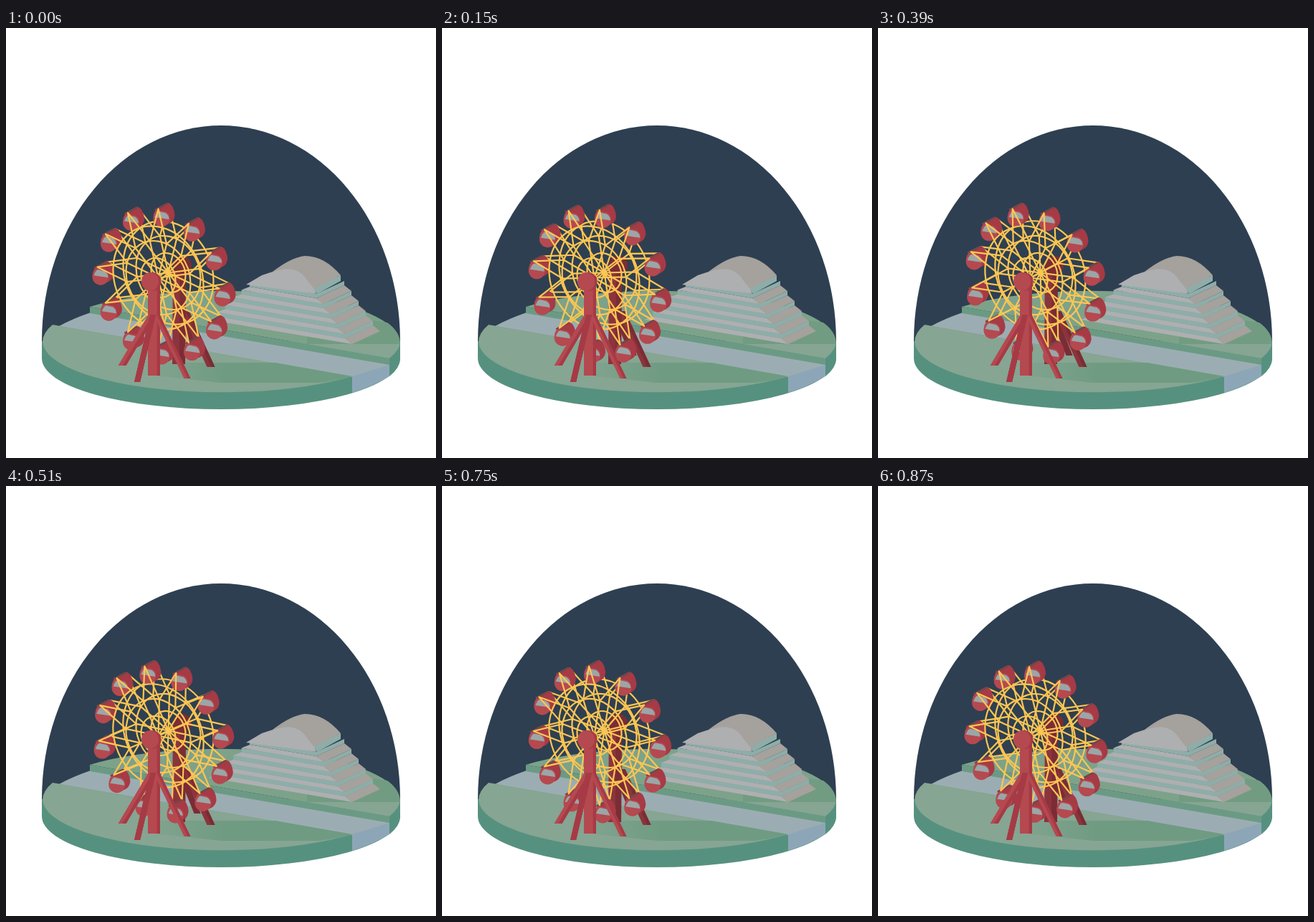
Animation of 600 by 600 pixels, one loop 900 ms. Source, as an HTML page with a canvas:

```html
<!DOCTYPE html>
<html>
<head>
<meta charset="utf-8">
<style>
  html, body { margin: 0; width: 100%; height: 100%; overflow: hidden; background: #fff; }
  canvas { display: block; }
</style>
</head>
<body>
<canvas id="stage" width="600" height="600"></canvas>
<script>
const ctx = document.getElementById('stage').getContext('2d');
const LOOP = 900, STEP = 30, CABINS = 12, SECTOR = 2 * Math.PI / CABINS;
const RADIUS = 85, STRETCH = 1.13, SKEW = 0.175;
const FRONT = [212.5, 348.5], BACK = [226.5, 341.5], HANG = [219.5, 357];
const RED = '#b54950', SHADE = '#a63a45', DEEP = '#7b2c34', DEEP_LIT = '#8b343c';

function fill(color, path) {
  ctx.fillStyle = color;
  ctx.fill(new Path2D(path));
}

function poly(color, ...points) {
  fill(color, 'M' + points.join('L') + 'Z');
}

function disc(color, x, y, rx, ry = rx) {
  ctx.fillStyle = color;
  ctx.beginPath();
  ctx.ellipse(x, y, rx, ry, 0, 0, 2 * Math.PI);
  ctx.fill();
}

// A slanted post, cut level at both ends, with its right part shaded.
function post(x0, y0, x1, y1, width, lit, shade, split = 0.55) {
  const half = width / 2, edge = width * split - half;
  poly(lit, [x0 - half, y0], [x0 + half, y0], [x1 + half, y1], [x1 - half, y1]);
  poly(shade, [x0 + edge, y0], [x0 + half, y0], [x1 + half, y1], [x1 + edge, y1]);
}

function drawGround() {
  fill('#2e3f51', 'M50 437A250 301 0 0 1 550 437Z');
  fill('#56917f', 'M50 437H550V461A250 71 0 0 1 50 461Z');
  fill('#9badb2', 'M74 416Q92 406 118 397L535 469V486L483 487Z');
  fill('#8da6b7', 'M483 486L535 470V486Q512 500 483 509Z');
  // Far bank
  fill('#7da28a', 'M117 389A250 71 0 0 1 535 461Z');
  fill('#729c82', 'M420 441V395L532 411Q550 424 550 441Z');
  fill('#86a592', 'M420 441H550Q549 452 535 461Z');
  fill('#6b9a84', 'M117 389L535 461V470L117 398Z');
  fill('#56917f', 'M535 461Q550 449 550 437V461Q550 474 535 486Z');
  // Near bank
  fill('#86a592', 'M65 414L483 486A250 71 0 0 1 65 414Z');
  const shadow = ctx.createLinearGradient(180, 0, 310, 0);
  shadow.addColorStop(0, '#6f9b8200');
  shadow.addColorStop(1, '#6f9b82');
  fill(shadow, 'M180 467H376L483 486Q462 492 437 495H300L180 482Z');
}

function drawBuilding() {
  const teal = '#8eada9', front = '#aeafb0', side = '#a5a19c';
  const corners = i => [
    [283 + 11.4 * i, 407 - 10.4 * i],
    [483 - 10 * i, 441 - 14 * i],
    [522 - 10 * i, 423 - 14 * i],
  ];
  for (let i = 0; i < 5; i++) {
    // A sloped ledge, then a low upright wall.
    const [a, b, c] = corners(i), next = corners(i + 1);
    const [d, e, f] = next.map(([x, y]) => [x, y + 6]);
    poly(front, a, b, e, d);
    poly(side, b, c, f, e);
    poly(teal, d, e, f, next[2], next[1], next[0]);
  }
  fill(teal, 'M428 363L467 345V353L434 371Z');
  fill(side, 'M372 340Q398 320 417 318Q444 318 467 345L430 364Z');
  fill(front, 'M335 358L357 345Q368 341 380 338Q408 331 421 353L430 364L433 371Z');
}

function drawBackSupport() {
  post(246, 405, 267, 457, 9, DEEP, DEEP);
  post(250, 395, 286, 473, 11, DEEP_LIT, DEEP);
  post(242, 330, 241, 469, 18, DEEP_LIT, DEEP);
  disc(DEEP, 246, 331, 13);
}

function drawWheel([x, y], angle) {
  ctx.save();
  ctx.transform(1, SKEW, 0, STRETCH, x, y);
  ctx.rotate(angle);
  ctx.beginPath();
  for (const r of [24, 45, 63]) {
    ctx.moveTo(r, 0);
    ctx.arc(0, 0, r, 0, 2 * Math.PI);
  }
  for (let i = 0; i < CABINS; i++) {
    // Each tip is braced to the two inner nodes beside it.
    ctx.moveTo(0, 0);
    ctx.lineTo(11.6, -43.5);
    ctx.lineTo(0, -RADIUS);
    ctx.lineTo(-11.6, -43.5);
    ctx.rotate(SECTOR);
  }
  ctx.restore();
  ctx.strokeStyle = '#fdc653';
  ctx.lineWidth = 2.2;
  ctx.lineJoin = 'round';
  ctx.stroke();
}

function drawCabin(angle) {
  const x = RADIUS * Math.sin(angle), y = -RADIUS * STRETCH * Math.cos(angle);
  ctx.save();
  ctx.translate(HANG[0] + x, HANG[1] + y + SKEW * x);
  fill(SHADE, 'M-12 -8L5 -17Q9 -17 12 -13Q16 -6 16 1Q15 9 8 12L-2 16Z');
  fill('#70484a', 'M-12 -8L5 -17L8 -16L-8 -7Z');
  fill(RED, 'M-14 3Q-13 -7 -8 -7L3 -5Q9 -2 9 5A11.5 11.5 0 0 1 -14 5Z');
  fill('#9ba6a7', 'M-12 3Q-9 -5 -6 -5L3 -3Q8 0 8 6Z');
  ctx.restore();
}

function drawFrontSupport() {
  post(203, 402, 162, 471, 11, RED, SHADE);
  post(205, 400, 183, 494, 8, SHADE, SHADE);
  post(206.5, 358, 206.5, 485, 17, RED, SHADE, 0.75);
  post(210, 400, 253, 489, 9, RED, SHADE);
  post(205, 400, 183, 494, 8, SHADE, SHADE);
  disc(DEEP, 211, 350, 5);
  disc(SHADE, 204, 354, 12.5, 13);
  disc(RED, 201, 354, 12, 13);
}

function draw(time) {
  const phase = Math.floor(time % LOOP / STEP) * STEP / LOOP;
  const angle = phase * SECTOR;
  ctx.clearRect(0, 0, 600, 600);
  drawGround();
  drawBuilding();
  drawBackSupport();
  drawWheel(BACK, angle);
  for (let i = 0; i < CABINS; i++) drawCabin(angle + i * SECTOR);
  drawWheel(FRONT, angle);
  drawFrontSupport();
}

const start = performance.now();
function tick() {
  draw(performance.now() - start);
  requestAnimationFrame(tick);
}
tick();
</script>
</body>
</html>
```
